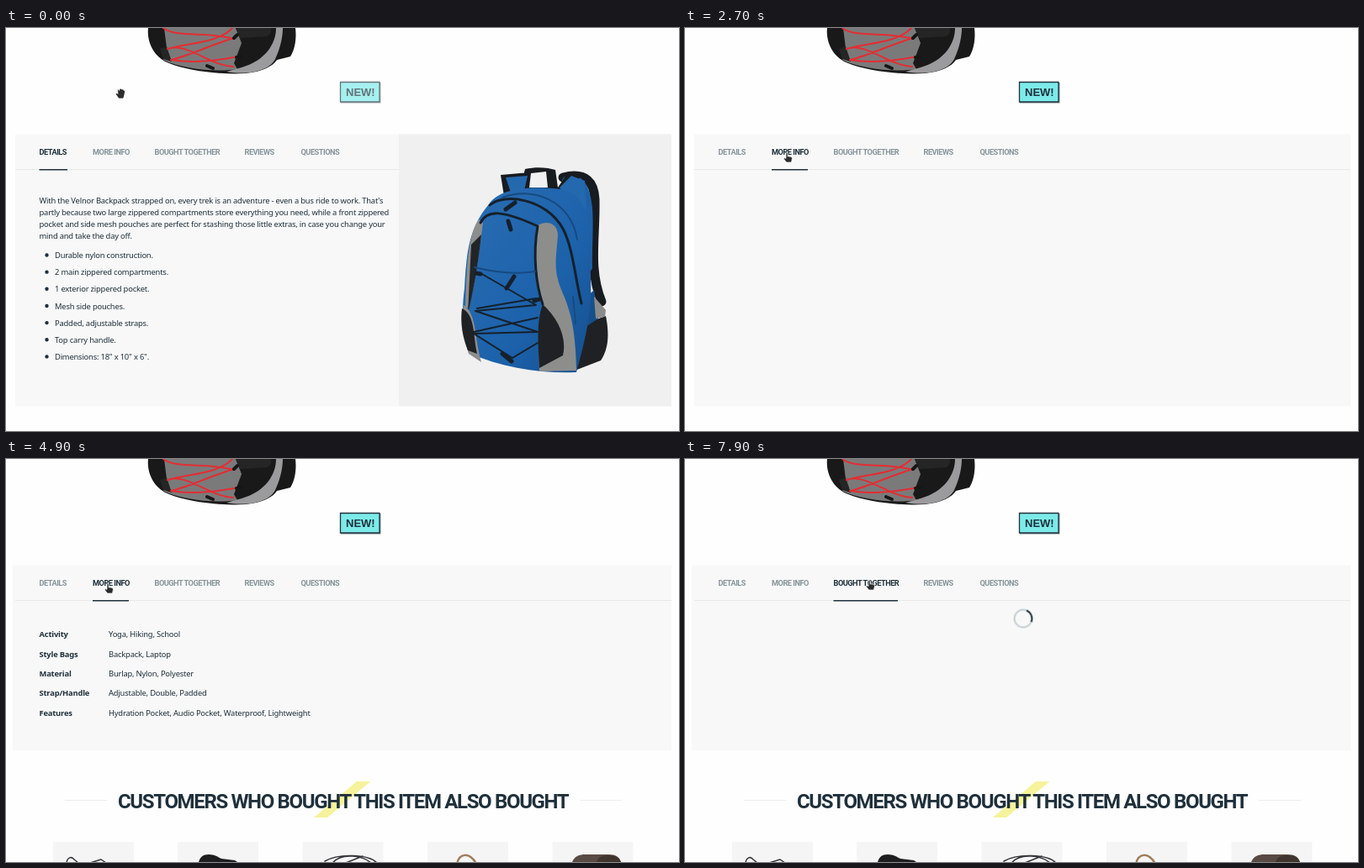
An HTML page that plays this animation: 800 by 480 pixels, repeating every 8 s.

```html
<!DOCTYPE html>
<html lang="en">
<head>
<meta charset="utf-8">
<title>Product tabs</title>
<style>
html, body { margin: 0; width: 100%; height: 100%; overflow: hidden; background: #fefefe; }
svg { display: block; width: 800px; height: 480px; }
text { fill: #1f303b; font: 9.4px "Noto Sans", sans-serif; letter-spacing: -.2px; }
.tab { font: 600 9.2px Roboto, sans-serif; letter-spacing: -.48px; fill: #87959a; }
.title { font: 600 24px Roboto, sans-serif; letter-spacing: -1.35px; }
.bold { font-weight: 700; }
.new { font: bold 13px "Liberation Sans", Arial, sans-serif; letter-spacing: 0; }
.line { fill: none; stroke-linecap: round; stroke-linejoin: round; }
.ring { fill: none; stroke: #c5ced2; stroke-width: 2; }

.a { animation: 8s step-end infinite; }
.details { animation-name: details; }
.t1 { animation-name: t1; }
.t2 { animation-name: t2; }
.t3 { animation-name: t3; }
.u2 { animation-name: u2; }
.u3 { animation-name: u3; }
.tall { animation-name: tall; }
.short { animation-name: short; }
.info { animation-name: info; }
.also { animation-name: also; }
.load1 { animation-name: load1; }
.load2 { animation-name: load2; }
.badge { animation-name: badge; }
.cursor { animation-name: move; }
.grab { animation-name: grab; }
.arrow { animation-name: arrow; }
.beam { animation-name: beam; }
.hand { animation-name: hand; }
.spin { stroke: #24343f; stroke-dasharray: 1 3; animation: spin .5s steps(5) infinite; }

@keyframes details { 0% { opacity: 1 } 33.75%, 100% { opacity: 0 } }
@keyframes t1 { 0% { fill: #1f303b } 33.75%, 100% { fill: #87959a } }
@keyframes t2 {
  0%, 8.75%, 91.25%, 100% { fill: #87959a }
  7.5%, 22.5% { fill: #1f303b }
}
@keyframes t3 { 0% { fill: #87959a } 73.75%, 100% { fill: #1f303b } }
@keyframes u2 { 0%, 91.25%, 100% { opacity: 0 } 33.75% { opacity: 1 } }
@keyframes u3 { 0% { opacity: 0 } 91.25%, 100% { opacity: 1 } }
@keyframes tall { 0% { opacity: 1 } 56.25%, 100% { opacity: 0 } }
@keyframes short { 0% { opacity: 0 } 56.25%, 100% { opacity: 1 } }
@keyframes info {
  0%, 91.25%, 100% { opacity: 0 }
  56.25% { opacity: .4; animation-timing-function: steps(5, start) }
  62.5% { opacity: 1 }
}
@keyframes also {
  0% { opacity: 0 }
  56.25% { opacity: .4; animation-timing-function: steps(5, start) }
  62.5%, 100% { opacity: 1 }
}
@keyframes load1 { 0%, 56.25%, 100% { opacity: 0 } 35% { opacity: 1 } }
@keyframes load2 { 0% { opacity: 0 } 92.5%, 100% { opacity: 1 } }
@keyframes badge {
  0% { opacity: .68 }
  6.25% { opacity: .68; animation-timing-function: steps(3, start) }
  10%, 100% { opacity: 1 }
}
@keyframes move {
  0% { transform: translate(136px, 78px) }
  3.75% { transform: translate(136px, 78px); animation-timing-function: steps(3, start) }
  7.5% { transform: translate(133px, 112px); animation-timing-function: steps(3, start) }
  11.25% { transform: translate(125px, 197px); animation-timing-function: steps(3, start) }
  15% { transform: translate(123px, 221px); animation-timing-function: steps(2, start) }
  17.5% { transform: translate(123px, 229px); animation-timing-function: steps(6, start) }
  25% { transform: translate(121px, 149px) }
  71.25% { transform: translate(121px, 149px); animation-timing-function: steps(5, start) }
  77.5%, 100% { transform: translate(219px, 145px) }
}
@keyframes grab { 0% { opacity: 1 } 6.25%, 100% { opacity: 0 } }
@keyframes arrow { 0%, 7.5%, 10%, 22.5%, 100% { opacity: 0 } 6.25%, 8.75%, 20% { opacity: 1 } }
@keyframes beam { 0%, 20%, 100% { opacity: 0 } 10% { opacity: 1 } }
@keyframes hand { 0%, 8.75% { opacity: 0 } 7.5%, 22.5%, 100% { opacity: 1 } }
@keyframes spin { to { transform: rotate(360deg) } }
</style>
</head>
<body>
<svg viewBox="0 0 800 480">
  <defs>
    <linearGradient id="blue" x2="1" y2="1">
      <stop stop-color="#2a6db2"/><stop offset=".6" stop-color="#1c62ab"/><stop offset="1" stop-color="#164f8e"/>
    </linearGradient>
  </defs>

  <!-- grey backpack -->
  <path fill="#191919" d="M169 0C167 18 177 36 194 42C215 51 258 56 285 54C305 52 318 45 322 38L338 34C345 23 345 8 344 0Z"/>
  <path fill="#7b7a7b" d="M188 0L191 24L187 38C210 49 250 53 275 49L271 42L280 18L273 0Z"/>
  <path fill="#9b9b9d" d="M321 0C321 19 308 39 280 47L262 52C290 57 314 50 320 37C327 22 329 9 329 0Z"/>
  <path fill="#252525" d="M273 0L278 12L310 10C316 7 315 3 315 0ZM191 22L197 40L187 37L183 25Z"/>
  <path class="line" stroke="#e32d32" stroke-width="2" d="M187 0C201 12 242 4 271 13M269 0C252 18 219 17 192 25M192 25C214 16 242 45 270 46M276 34C250 39 220 42 197 38M196 38C218 33 246 19 271 12"/>
  <path class="line" stroke="#161616" stroke-width="4" d="M239 45L246 48M271 12L275 8M274 35L279 34"/>

  <g class="a badge">
    <path fill="#7d9095" d="M398 65H445.5V89.5H398Z"/>
    <path fill="#7cebea" stroke="#20323c" stroke-width="1.3" d="M397.5 64.5H444V88H397.5Z"/>
    <text class="new" x="404" y="81">NEW!</text>
  </g>

  <!-- panel -->
  <path class="a tall" fill="#f8f8f8" d="M11 126.5H791V450.5H11Z"/>
  <path class="a short" fill="#f8f8f8" d="M8 126.5H791V347H8Z"/>
  <path fill="#e7eaea" d="M11 168H791V169H11Z"/>

  <g class="a details">
    <path fill="#f0f0f0" d="M467 126.5H791V450.5H467Z"/>
    <text x="39.5" y="209">With the Velnor Backpack strapped on, every trek is an adventure - even a bus ride to work. That's</text>
    <text x="39.5" y="223">partly because two large zippered compartments store everything you need, while a front zippered</text>
    <text x="39.5" y="237">pocket and side mesh pouches are perfect for stashing those little extras, in case you change your</text>
    <text x="39.5" y="251">mind and take the day off.</text>
    <path class="line" stroke="#1f303b" stroke-width="4.4" d="M48.5 270.5h0m0 20.15h0m0 20.15h0m0 20.15h0m0 20.15h0m0 20.15h0m0 20.15h0"/>
    <text x="58" y="274">Durable nylon construction.</text>
    <text x="58" y="294.2">2 main zippered compartments.</text>
    <text x="58" y="314.3">1 exterior zippered pocket.</text>
    <text x="58" y="334.5">Mesh side pouches.</text>
    <text x="58" y="354.6">Padded, adjustable straps.</text>
    <text x="58" y="374.8">Top carry handle.</text>
    <text x="58" y="395">Dimensions: 18" x 10" x 6".</text>

    <!-- blue backpack -->
    <path class="line" stroke="#181b20" stroke-width="11" d="M662 178C690 171 699 184 700 204C701 250 692 287 708 326"/>
    <path class="line" stroke="#1d61a8" stroke-width="10" d="M666 182C682 176 689 190 692 214C694 240 691 262 692 285"/>
    <path fill="#181b20" d="M588 175L622 172L614 180L617 168C630 165 644 166 653 169L656 190L668 172L684 174L672 200L592 200Z"/>
    <path fill="#2468ae" d="M594 178L620 176L616 194L600 196ZM658 190L672 176L688 182L690 216L673 208Z"/>
    <path fill="#f0f0f0" d="M624 173L642 171L644 190H622Z"/>
    <path fill="#202124" d="M688 352L713 343C718 368 715 384 707 396L676 408Z"/>
    <path fill="#174f8c" d="M682 328L699 312L704 346L686 358Z"/>
    <path fill="#8b8b89" d="M699 320L713 336L712 344L701 346Z"/>
    <path fill="url(#blue)" d="M574 210C585 192 620 187 660 192C686 197 693 220 694 250L695 300C697 340 688 372 678 410C640 412 590 405 550 387C543 365 541 340 545 310C547 270 550 238 574 210Z"/>
    <path fill="#8d8e8c" d="M562 228C549 246 547 290 546 338C556 322 560 285 567 232Z"/>
    <path fill="#222427" d="M553 258L565 246C561 284 555 316 549 340Z"/>
    <path fill="#8d8e8c" d="M544 330C560 340 557 372 565 398L550 388C543 365 541 348 544 330Z"/>
    <path fill="#202124" d="M542 334C558 342 555 366 560 388L549 384C542 366 540 350 542 334Z"/>
    <path fill="#8d8e8c" d="M632 235C643 229 655 232 656 246C654 276 650 288 661 314C672 338 677 362 678 408L634 409C633 380 632 350 640 333C625 308 628 260 632 235Z"/>
    <path fill="#202124" d="M638 329C656 346 667 368 662 390L634 405C632 372 631 348 638 329Z"/>
    <g class="line" stroke="#15202c" stroke-width="3">
      <path d="M564 232C572 216 590 217 632 236C626 270 630 306 638 329M575 211C592 196 642 203 662 239C674 262 676 295 684 328"/>
      <path stroke="#174a80" stroke-width="2" d="M590 202C625 188 672 205 679 252M557 285C585 292 610 293 629 290M674 320L677 352"/>
      <path stroke-width="2" d="M564 292L630 330L558 337L632 362L556 364L602 393L632 375M630 322L560 334M632 345L556 362"/>
      <path stroke-width="5" d="M605 208L594 216M597 230L600 240M604 296L595 310M590 388L601 397M559 292L564 293M628 325L634 323"/>
    </g>
  </g>

  <!-- tabs -->
  <text class="tab a t1" x="39.5" y="151.3">DETAILS</text>
  <text class="tab a t2" x="103" y="151.3">MORE INFO</text>
  <text class="tab a t3" x="176.5" y="151.3">BOUGHT TOGETHER</text>
  <text class="tab" x="283.5" y="151.3">REVIEWS</text>
  <text class="tab" x="350.5" y="151.3">QUESTIONS</text>
  <g fill="#1f303b">
    <path class="a details" d="M39.5 168H73V169.5H39.5Z"/>
    <path class="a u2" d="M103 168H146V169.5H103Z"/>
    <path class="a u3" d="M176.5 168H253V169.5H176.5Z"/>
  </g>

  <!-- loaders -->
  <g class="a load1 ring">
    <g transform="translate(402 190) rotate(-119)">
      <circle r="10.4"/><circle class="spin" r="10.4" pathLength="4"/>
    </g>
  </g>
  <g class="a load2 ring">
    <g transform="translate(402 190) rotate(5)">
      <circle r="10.4"/><circle class="spin" r="10.4" pathLength="4"/>
    </g>
  </g>

  <g class="a info">
    <text class="bold" x="39.5" y="212.3">Activity</text><text x="122" y="212.3">Yoga, Hiking, School</text>
    <text class="bold" x="39.5" y="235.6">Style Bags</text><text x="122" y="235.6">Backpack, Laptop</text>
    <text class="bold" x="39.5" y="259">Material</text><text x="122" y="259">Burlap, Nylon, Polyester</text>
    <text class="bold" x="39.5" y="282.3">Strap/Handle</text><text x="122" y="282.3">Adjustable, Double, Padded</text>
    <text class="bold" x="39.5" y="305.6">Features</text><text x="122" y="305.6">Hydration Pocket, Audio Pocket, Waterproof, Lightweight</text>
  </g>

  <g class="a also">
    <path fill="#f6f39c" d="M417 384H433.5L382 427H366Z"/>
    <path fill="#ebeded" d="M70 406H120V407H70ZM682 406H732V407H682Z"/>
    <text class="title" x="133" y="415.7">CUSTOMERS WHO BOUGHT THIS ITEM ALSO BOUGHT</text>
    <path fill="#f5f5f5" d="M56 456h96v24h-96zM204 456h96v24h-96zM352.5 456h96v24h-96zM501 456h96v24h-96zM649.5 456h96v24h-96z"/>
    <path class="line" stroke="#34343a" stroke-width="1.5" d="M72 481C73 474 78 473 81 477L86 481M100 481L113 477L119 481M379 479C394 470 430 470 441 481M388 481C400 468 425 473 434 481M404 481L424 473"/>
    <path fill="#1e1e20" d="M229 480C231 474 234 471 241 471C248 471 252 474 256 476L272 478L275 480Z"/>
    <path class="line" stroke="#a07d5b" stroke-width="2.5" d="M536 482C539 469 551 468 559 482"/>
    <path fill="#594a43" d="M673 480C676 473 681 471 689 471H716C725 471 729 474 731 480Z"/>
    <path fill="#40342f" d="M702 480C704 474 708 472 717 472C725 472 729 475 731 480Z"/>
  </g>

  <g class="a cursor">
    <g fill="#2b2c2e" stroke="#fff" stroke-width=".7">
      <path class="a grab" d="M-2 6L-5.500 1C-5.500-1-4-1-3 0.500L-3.500-4C-3-5.500-2-5-1.500-3.500L-.8-5.500C0-6.500 1-6 1.200-5L2.500-5C3.500-5.500 4-4.500 4-3.500C5.500-4 5.500-3 5.500-2L4.500 3L3.500 6Z"/>
      <path class="a arrow" d="M0 0V11L2.500 8.500L4.500 12.500L6 11.800L4.200 8H7.500Z"/>
      <path class="a hand" d="M-1 0C0-1 1.200-.5 1.200 1V4C4 3.600 6.500 4.500 6.500 6L5.500 11H-.5L-3.500 7C-3.800 5.500-2 5.300-1 6.500Z"/>
    </g>
    <path class="a beam line" stroke="#34393d" d="M-2-5H-.500L0-4.500L.500-5H2M0-4.500V4.500M-2 5H-.500L0 4.500L.500 5H2"/>
  </g>
</svg>
</body>
</html>
```
